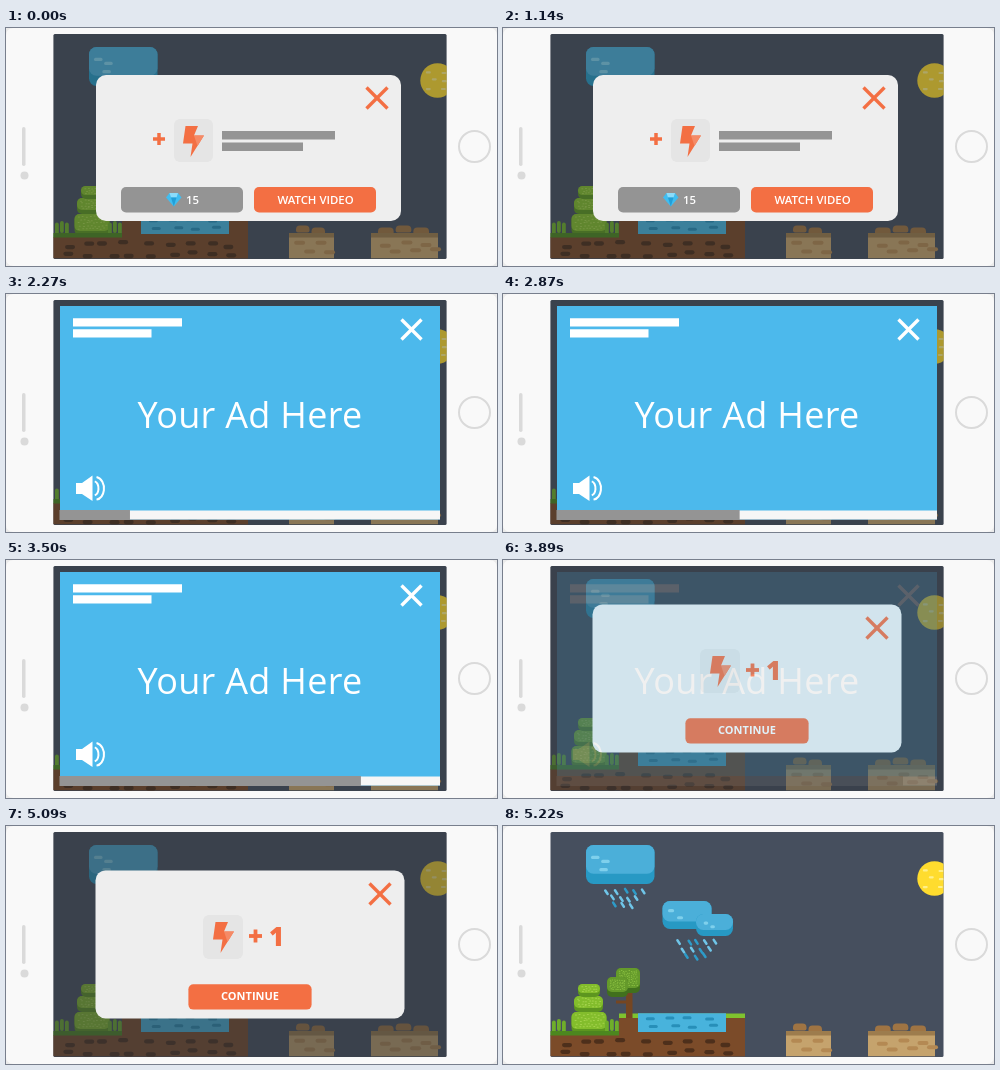
Animation, 491 px wide and 238 px high, one loop 5.79 s. Source, as an HTML page with a canvas:

```html
<!DOCTYPE html>
<html lang="en">
<head>
<meta charset="utf-8">
<title>Rewarded video flow</title>
<style>
html, body { margin: 0; width: 100%; height: 100%; overflow: hidden; background: #f9f9f9; }
canvas { display: block; width: 491px; height: 238px; }
</style>
</head>
<body>
<canvas id="stage" width="491" height="238"></canvas>
<script>
const W = 491, H = 238, LOOP = 5790, STEP = 30;
const ORANGE = '#f36f43', GRAY = '#949494', FONT = '"Open Sans", sans-serif';
const stage = document.getElementById('stage').getContext('2d');
let c = stage;

let seed = 7;
function random() {
  seed = seed * 16807 % 2147483647;
  return seed / 2147483647;
}

function box(x, y, w, h, r, color) {
  c.fillStyle = color;
  c.beginPath();
  c.roundRect(x, y, w, h, r);
  c.fill();
}
function disc(x, y, r, color) {
  c.fillStyle = color;
  c.beginPath();
  c.arc(x, y, r, 0, Math.PI * 2);
  c.fill();
}
function poly(color, ...p) {
  c.fillStyle = color;
  c.beginPath();
  for (let i = 0; i < p.length; i += 2) c.lineTo(p[i], p[i + 1]);
  c.closePath();
  c.fill();
}
function line(x1, y1, x2, y2, width, color) {
  c.strokeStyle = color;
  c.lineWidth = width;
  c.beginPath();
  c.moveTo(x1, y1);
  c.lineTo(x2, y2);
  c.stroke();
}
function cross(x, y, r, width, color) {
  line(x - r, y - r, x + r, y + r, width, color);
  line(x - r, y + r, x + r, y - r, width, color);
}
function plus(x, y, r, width) {
  line(x - r, y, x + r, y, width, ORANGE);
  line(x, y - r, x, y + r, width, ORANGE);
}
function label(s, x, y, size, weight, color = '#fff', align = 'center') {
  c.font = `${weight} ${size}px ${FONT}`;
  c.textAlign = align;
  c.fillStyle = color;
  c.fillText(s, x, y);
}
function layer(draw) {
  const canvas = document.createElement('canvas');
  canvas.width = W;
  canvas.height = H;
  c = canvas.getContext('2d');
  draw();
  c = stage;
  return canvas;
}

// Calls draw at one jittered point in each cell of a grid, odd rows shifted
function scatter(x, y, w, h, cols, rows, draw) {
  for (let row = 0; row < rows; row++) {
    for (let col = 0; col < cols; col++) {
      const u = (col + 0.3 * (row % 2) + 0.5 * random()) / cols;
      const v = (row + 0.6 * random()) / rows;
      draw(x + u * w, y + v * h);
    }
  }
}
function dashes(x, y, w, h, cols, rows, length, thick, color) {
  scatter(x, y, w, h, cols, rows, (px, py) => box(px, py, length, thick, thick / 2, color));
}
function rain(x, y) {
  c.lineCap = 'round';
  for (let row = 0; row < 3; row++) {
    const inset = 4 * row;
    scatter(x + inset, y + 7 * row, 44 - 2.5 * inset, 5, 5 - row, 1, (px, py) => {
      line(px - 1.2, py - 1.8, px + 1.2, py + 1.8, 2.5, random() < 0.5 ? '#2d9bc8' : '#6fc5e8');
    });
  }
  c.lineCap = 'butt';
}

function twoTone(x, y, w, h, r, top, bottom, lip) {
  box(x, y, w, h, r, bottom);
  box(x, y, w, h - lip, r, top);
}
function cloud(x, y, w, h) {
  const lip = h / 4 + 0.5;
  twoTone(x, y, w, h, 7.5, '#4bafd9', '#2799c4', lip);
  dashes(x + 5, y + 7, w / 3, h - lip - 8, 1, Math.round(h / 13), w / 8, 3.2, '#7fd0ec');
}
function bush(x, y, w, h) {
  twoTone(x, y, w, h, 5, '#83bd2c', '#5d961f', 4);
  dashes(x + 3, y + 1.5, w - 6, h - 6, w / 4 | 0, h / 4 | 0, 2, 1, '#a4d24c');
}
function leaves(x, y, w, h) {
  twoTone(x, y, w, h, 5, '#659a2b', '#41701d', 5);
  dashes(x + 2, y + 2, w - 5, h - 9, w / 3 | 0, h / 3 | 0, 1.5, 1, '#8abf40');
}
function grass(x) {
  for (let i = 0; i < 3; i++) box(x + 5 * i, 194.5 - 1.5 * (i % 2), 3.8, 12, 1.9, '#6fae2a');
}
function crate(x, w, rocks) {
  const gap = (w - 14) / rocks;
  for (let i = 0; i < rocks; i++) {
    const high = i === rocks - 2;
    box(x + 7 + i * gap, high ? 197.5 : 199.5, gap - 2, 7, [4, 4, 2, 2], '#9f7443');
  }
  box(x, 205, w, 25.3, 0, '#c5a36d');
  box(x, 205, w, 4.5, 0, '#9d7c4d');
  dashes(x + 4, 212, w - 8, 14, rocks, 2, 11, 4, '#b48953');
}

function scene() {
  box(0, 0, W, H, 0, '#ebebeb');
  box(0, 0, W, H, 7, '#f9f9f9');
  box(16, 99, 3.5, 39, 1.7, '#dadada');
  disc(18.5, 147.5, 4, '#dadada');
  c.strokeStyle = '#dadada';
  c.lineWidth = 2;
  c.beginPath();
  c.arc(468.5, 118.5, 15.5, 0, Math.PI * 2);
  c.stroke();

  c.save();
  c.beginPath();
  c.roundRect(47.5, 6, 393, 225, 1.5);
  c.clip();
  box(47, 6, 394, 225, 0, '#464f5e');

  cloud(83, 19, 68.5, 39);
  rain(102, 64);
  cloud(159.5, 75, 49, 28);
  cloud(193, 88, 37, 22);
  rain(174, 115);
  disc(431.5, 52.5, 17.2, '#ffdc2e');
  dashes(419, 43, 22, 20, 2, 3, 5, 2.2, '#fff08a');

  // Land, water and plants
  box(47, 209, 195, 21.3, 0, '#7b4b29');
  box(116, 191, 126, 39.3, 0, '#7b4b29');
  box(116, 187.5, 126, 4.5, 0, '#7fc32e');
  dashes(50, 212, 184, 18, 9, 2, 10, 4.3, '#4d2f1b');
  box(123, 167, 6.5, 25, 0, '#754622');
  line(113, 176, 124, 176, 3, '#754622');
  leaves(113, 142, 24, 25);
  leaves(104, 151, 21, 20);
  bush(68.5, 186, 35, 21);
  bush(71, 170, 29, 16);
  bush(75, 158, 22, 13);
  grass(49);
  grass(102);
  box(47, 205, 69, 4.5, 0, '#4c871f');
  box(135, 187.3, 88, 18.7, 0, '#48b3dc');
  dashes(139, 190, 78, 13, 4, 2, 9, 3, '#278fb9');
  crate(283, 45, 2);
  crate(365, 67, 3);
  c.restore();
}

function bolt(x, y) {
  poly(ORANGE, x + 2.5, y, x + 15, y, x + 11, y + 9.5, x + 21, y + 9.5, x + 7.5, y + 31, x + 9.5, y + 17.5, x, y + 17.5);
  poly('#f58a66', x + 11, y + 9.5, x + 21, y + 9.5, x + 14.5, y + 20);
}
function offer() {
  box(90, 47, 305, 146, 10, '#eee');
  cross(371, 70, 10.5, 3.3, ORANGE);
  plus(153, 111, 6, 3.5);
  box(168, 91, 39, 43, 6, '#e5e5e5');
  bolt(177, 98);
  box(216, 103, 113, 8.5, 0, GRAY);
  box(216, 114.5, 81, 8.5, 0, GRAY);
  box(115, 159, 122, 25.5, 5, GRAY);
  box(248, 159, 122, 25.5, 5, ORANGE);
  poly('#40bdf0', 163.5, 165, 172, 165, 175.5, 169.5, 167.8, 178.5, 160, 169.5);
  poly('#8bdcfa', 163.5, 165, 172, 165, 170.5, 169.5, 165, 169.5);
  poly('#229fd8', 165, 169.5, 170.5, 169.5, 167.8, 178.5);
  label('15', 180, 176, 11.4, 600, '#fff', 'left');
  label('WATCH VIDEO', 309.5, 176, 11.4, 600);
}
function reward() {
  shade('rgba(59,66,76,.22)');
  box(89.5, 44.4, 309, 148.1, 10, '#eee');
  cross(374, 68, 10.5, 3.4, ORANGE);
  box(197, 89, 40, 44, 6, '#e5e5e5');
  bolt(207, 96);
  plus(249.5, 110, 6.5, 3.8);
  label('1', 263, 119.5, 26, 800, ORANGE, 'left');
  box(182.4, 158.2, 123.2, 25.4, 5, ORANGE);
  label('CONTINUE', 244, 174, 11, 700);
}
function shade(color) {
  box(47.5, 6, 393, 225, 1.5, color);
}

function advert() {
  box(54, 12, 380, 213.5, 0, '#4cb9ec');
  box(67, 24.3, 109, 8.2, 0, '#fff');
  box(67, 35.3, 78.5, 8.2, 0, '#fff');
  cross(405.5, 35.5, 10, 3.3, '#fff');
  poly('#fff', 70, 189, 76, 189, 86.5, 181.5, 86.5, 207, 76, 200, 70, 200);
  c.strokeStyle = '#fff';
  c.lineWidth = 2;
  for (let i = 0; i < 2; i++) {
    c.beginPath();
    c.ellipse(88 + i, 194.3, 4.5 * (i + 1), 7 + 4.5 * i, 0, -1.4, 1.4);
    c.stroke();
  }
  box(54, 216.4, 380, 9.1, 0, '#f6f6f6');
}
function progress(end) {
  box(53.5, 216, end - 53.5, 10, 0, GRAY);
}

const game = layer(scene);
const dim = layer(() => shade('rgba(41,46,50,.38)'));
const offerCard = layer(offer);
const rewardCard = layer(reward);
const intro = layer(() => {
  advert();
  poly('#fff', 217, 88, 271, 119, 217, 150);
  progress(62);
});
const video = layer(() => {
  advert();
  c.letterSpacing = '0.3px';
  label('Your Ad Here', 244, 134, 36, 400);
});

// Number of fixed steps taken since a start time, limited to n
const steps = (t, start, n) => Math.max(0, Math.min(n, Math.floor((t - start) / STEP) + 1));

function put(image, alpha = 1) {
  c.globalAlpha = alpha;
  c.drawImage(image, 0, 0);
  c.globalAlpha = 1;
}
function touch(x, t, start, fade) {
  if (t < start) return;
  const alpha = 0.5 * (1 - steps(t, fade, 8) / 8);
  disc(x, 171.5, 8.5, `rgba(255,255,255,${alpha})`);
}
function playVideo(t) {
  const end = 62 + 338 * steps(t, 1970, 60) / 60;
  put(layer(() => {
    c.drawImage(video, 0, 0);
    progress(end);
  }), 1 - steps(t, 3770, 6) / 6);
}

function render(t) {
  put(game);
  const cover = 1 - steps(t, 5130, 4) / 4;
  put(dim, cover);
  if (t < 1700) {
    put(offerCard);
    touch(309.5, t, 330, 930);
    if (t >= 1670) put(intro, 0.5);
  } else {
    if (t >= 3770) put(rewardCard, cover);
    touch(244.5, t, 4520, 4820);
    if (t < 3920) playVideo(t);
  }
}

const begin = performance.now();
function tick() {
  render((performance.now() - begin) % LOOP);
  requestAnimationFrame(tick);
}
tick();
</script>
</body>
</html>
```
